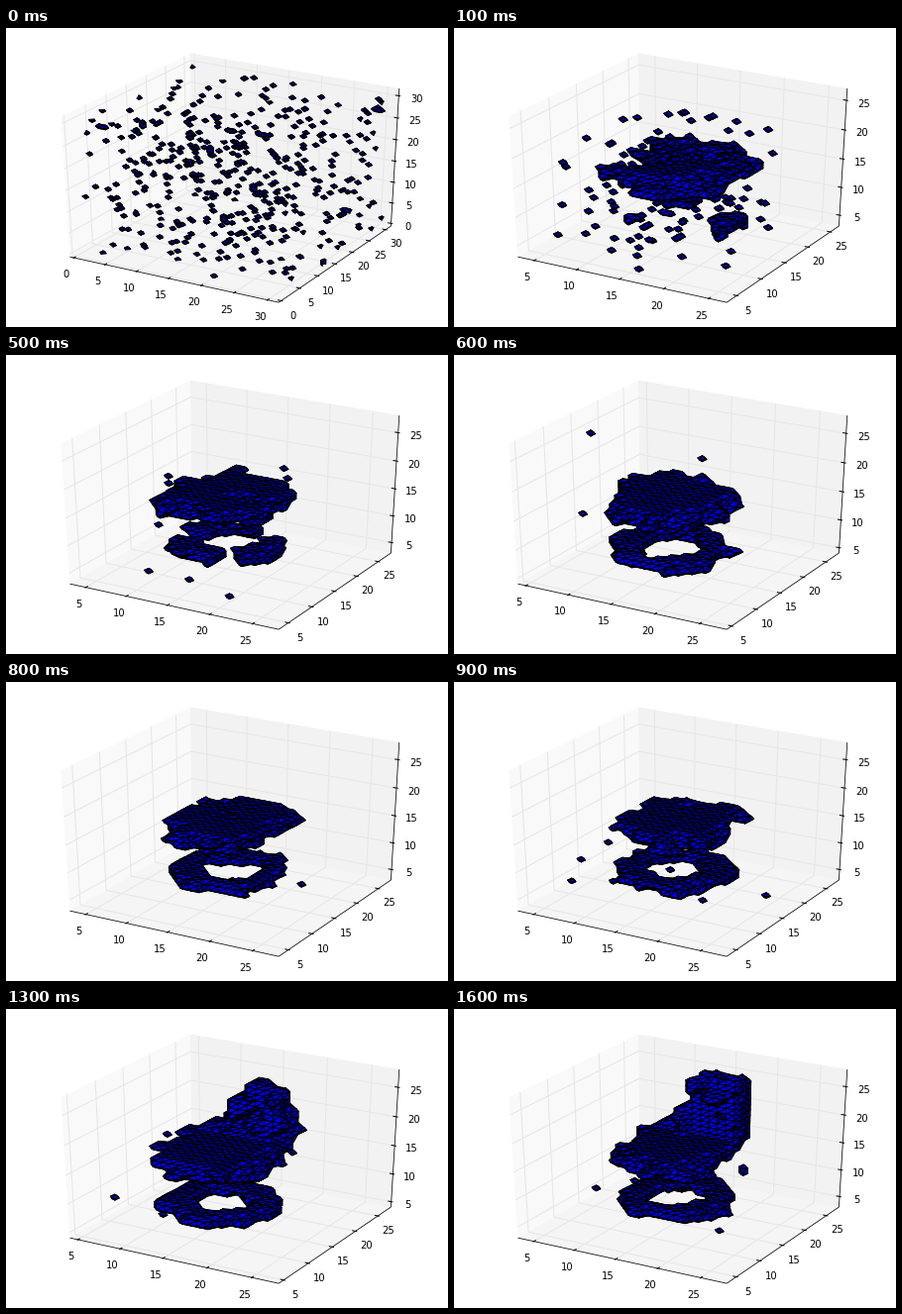
Recreate the animation shown at these times as a matplotlib script. Size 446 by 302 pixels, loop 2600 ms.

```python
import numpy as np
import matplotlib.pyplot as plt
from matplotlib.animation import FuncAnimation
from matplotlib.collections import LineCollection, PolyCollection

WIDTH, HEIGHT, DPI = 446, 302, 64
PT = 72 / DPI  # points per pixel
SIZE = 32
LAST = 16  # the finished chair stays from here on
EDGE = 0.5 + 1 / 48  # half size of the padded axes box
DELTA = 1 / 12

# Camera basis for elevation 30, azimuth -60
ELEV, AZIM = np.radians(30), np.radians(-60)
N = np.array([np.cos(AZIM) * np.cos(ELEV), np.sin(AZIM) * np.cos(ELEV), np.sin(ELEV)])
U = np.array([-np.sin(AZIM), np.cos(AZIM), 0])
V = np.cross(N, U)

X, Y, Z = np.indices((SIZE,) * 3)
DX, DY = X - 14.2, Y - 16.8  # offsets from the chair's upright axis


def to_pixels(unit):
    unit = np.asarray(unit, float)
    dist = 10 - unit @ N
    x = 7.2 + 432 * (unit @ U / dist + 0.095) / 0.185
    y = HEIGHT - 7.2 - 288 * (unit @ V / dist + 0.095) / 0.185
    return np.stack([x, y], -1)


def limits(step):
    if step == 0:
        return 0, SIZE - 1
    return (4.5 if step % 7 == 6 else 3.5), (27.5 if step > 3 else 26.5)


def smooth_noise(rng):
    field = rng.normal(size=(SIZE,) * 3)
    for axis in range(3):
        field = np.roll(field, 1, axis) + 2 * field + np.roll(field, -1, axis)
    return field / field.std()


def chair(step, rough):
    """Seat, ring-shaped base and growing back, with ragged borders."""
    ragged = (0.55 - 0.25 * step / LAST) * rough

    seat = np.abs(DX / 5.6) ** 3 + np.abs(DY / 6.4) ** 3 < 1 + ragged
    seat &= np.abs(Z - 15) <= 1

    base = np.abs(np.hypot(DX, DY) - 4.6) < 1.5 + ragged
    base &= np.cos(3 * np.arctan2(DY, DX)) > 0.45 - 0.25 * step  # three lobes join up
    base &= (Z == 6) | (Z == 7)

    grown = np.sqrt(max(step - 9, 0) / (LAST - 9))
    left = 14.5 - 4.7 * ((27 - Z) / 10) ** 2
    back = (X > left + ragged) & (X < 19.3 + ragged)
    back &= (Y > 20.5 + rough / 2) & (Y <= 23)
    back &= (Z >= 19 - 3 * grown) & (Z < 20.5 + 6.5 * grown + ragged)

    solid = seat | base | (back if grown else False)
    return solid & (rough > -0.3 - 0.5 * step)


def volume(step):
    rng = np.random.default_rng(40 + step)
    low, high = limits(step)
    if step == 0:
        grid = np.zeros((SIZE,) * 3, bool)
        grid.flat[rng.choice(grid.size, 450, replace=False)] = True
        return grid
    grid = chair(step, smooth_noise(rng)) & (Z < high)
    specks = rng.normal((15, 15, 12), (5, 5, 6), (10 + 130 // step ** 2, 3))
    x, y, z = np.clip(specks.round(), np.ceil(low), np.floor(high)).astype(int).T
    grid[x, y, z] = True
    return grid


def cell_triangles(code):
    """Triangles of one marching-cubes cell, traced around its faces."""
    corner = lambda i: np.array([i & 1, i >> 1 & 1, i >> 2 & 1])
    follow = {}
    for d in range(3):
        e, f = (d + 1) % 3, (d + 2) % 3
        for side in (0, 1):
            ring = [side << d | a << e | b << f for a, b in ((0, 0), (1, 0), (1, 1), (0, 1))]
            ring = ring if side else ring[::-1]
            inside = [code >> i & 1 for i in ring]
            edge = lambda k: frozenset((ring[k % 4], ring[(k + 1) % 4]))
            for k in range(4):
                if not inside[k] and inside[(k + 1) % 4]:
                    m = k + 1
                    while inside[(m + 1) % 4]:
                        m += 1
                    follow[edge(k)] = edge(m)
    triangles = []
    while follow:
        start, current = follow.popitem()
        loop = [start]
        while current != start:
            loop.append(current)
            current = follow.pop(current)
        points = [sum(corner(i) for i in pair) / 2 for pair in loop]
        triangles += [(points[0], points[k], points[k + 1]) for k in range(1, len(points) - 1)]
    return np.array(triangles)


CELLS = {}


def surface(grid):
    n = SIZE - 1
    codes = np.zeros((n, n, n), int)
    for i in range(8):
        x, y, z = i & 1, i >> 1 & 1, i >> 2 & 1
        codes += grid[x:x + n, y:y + n, z:z + n].astype(int) << i
    mesh = []
    for code in np.unique(codes):
        if 0 < code < 255:
            if code not in CELLS:
                CELLS[code] = cell_triangles(int(code))
            origins = np.argwhere(codes == code)
            mesh.append((origins[:, None, None] + CELLS[code]).reshape(-1, 3, 3))
    return np.concatenate(mesh)


def draw_surface(grid, low, high):
    mesh = surface(grid)
    normal = np.cross(mesh[:, 1] - mesh[:, 0], mesh[:, 2] - mesh[:, 0])
    normal /= np.linalg.norm(normal, axis=1, keepdims=True)
    shade = normal @ (-1, -1, 0.5)
    colors = np.zeros((len(mesh), 3))
    colors[:, 2] = 0.5 + 0.5 * (shade - shade.min()) / np.ptp(shade)
    unit = (mesh - low) / (high - low) - 0.5
    order = np.argsort((unit @ N).mean(axis=1))
    ax.add_collection(PolyCollection(to_pixels(unit[order]), facecolors=colors[order],
                                     edgecolors="black", linewidths=PT, zorder=5))


def place(axis, value, others):
    """Unit point with one coordinate set and the remaining two given in order."""
    point = list(others)
    point.insert(axis, value)
    return point


def draw_axes(low, high):
    e = EDGE
    square = [(-e, -e), (-e, e), (e, e), (e, -e)]
    for axis, level, gray in ((0, -e, 0.975), (1, e, 0.95), (2, -e, 0.9625)):
        pane = to_pixels([place(axis, level, s) for s in square])
        ax.add_collection(PolyCollection([pane], facecolors=str(gray), edgecolors=str(gray),
                                         linewidths=PT, zorder=1))

    # Per axis: grid bends, fixed side of the axis line, axis along which ticks point
    layout = [([(-e, -e), (e, -e), (e, e)], (-e, -e), 1),
              ([(e, -e), (-e, -e), (-e, e)], (e, -e), 0),
              ([(-e, -e), (-e, e), (e, e)], (e, e), 0)]
    grid, ticks, spines = [], [], []
    for axis, (bends, fixed, direction) in enumerate(layout):
        spines.append(to_pixels([place(axis, s, fixed) for s in (-e, e)]))
        away = [f + np.sign(f) * 0.7 * DELTA for f in fixed]
        for value in range(int(np.ceil(low / 5)) * 5, int(high) + 1, 5):
            at = (value - low) / (high - low) - 0.5
            grid.append(to_pixels([place(axis, at, b) for b in bends]))
            ends = np.array([place(axis, at, fixed)] * 2, float)
            ends[:, direction] += np.sign(ends[0, direction]) * DELTA * np.array([0.1, -0.2])
            ticks.append(to_pixels(ends))
            x, y = to_pixels(place(axis, at, away))
            ax.text(x - 0.7, y, str(value), ha="center", va="top", fontsize=10 * PT,
                    family="DejaVu Sans", zorder=6)
    for lines, color, width, order in ((grid, "0.9", 1, 2), (spines, "black", 0.75, 3),
                                       (ticks, "black", 1, 4)):
        ax.add_collection(LineCollection(lines, colors=color, linewidths=width * PT, zorder=order))


def draw(frame):
    step = min(frame, LAST)
    ax.clear()
    ax.set(xlim=(0, WIDTH), ylim=(HEIGHT, 0))
    ax.axis("off")
    draw_axes(*limits(step))
    draw_surface(volume(step), *limits(step))
    return []


fig = plt.figure(figsize=(WIDTH / DPI, HEIGHT / DPI), dpi=DPI, facecolor="white")
ax = fig.add_axes([0, 0, 1, 1])
animation = FuncAnimation(fig, draw, frames=26, interval=100, repeat=True, repeat_delay=0)
plt.show()
```
